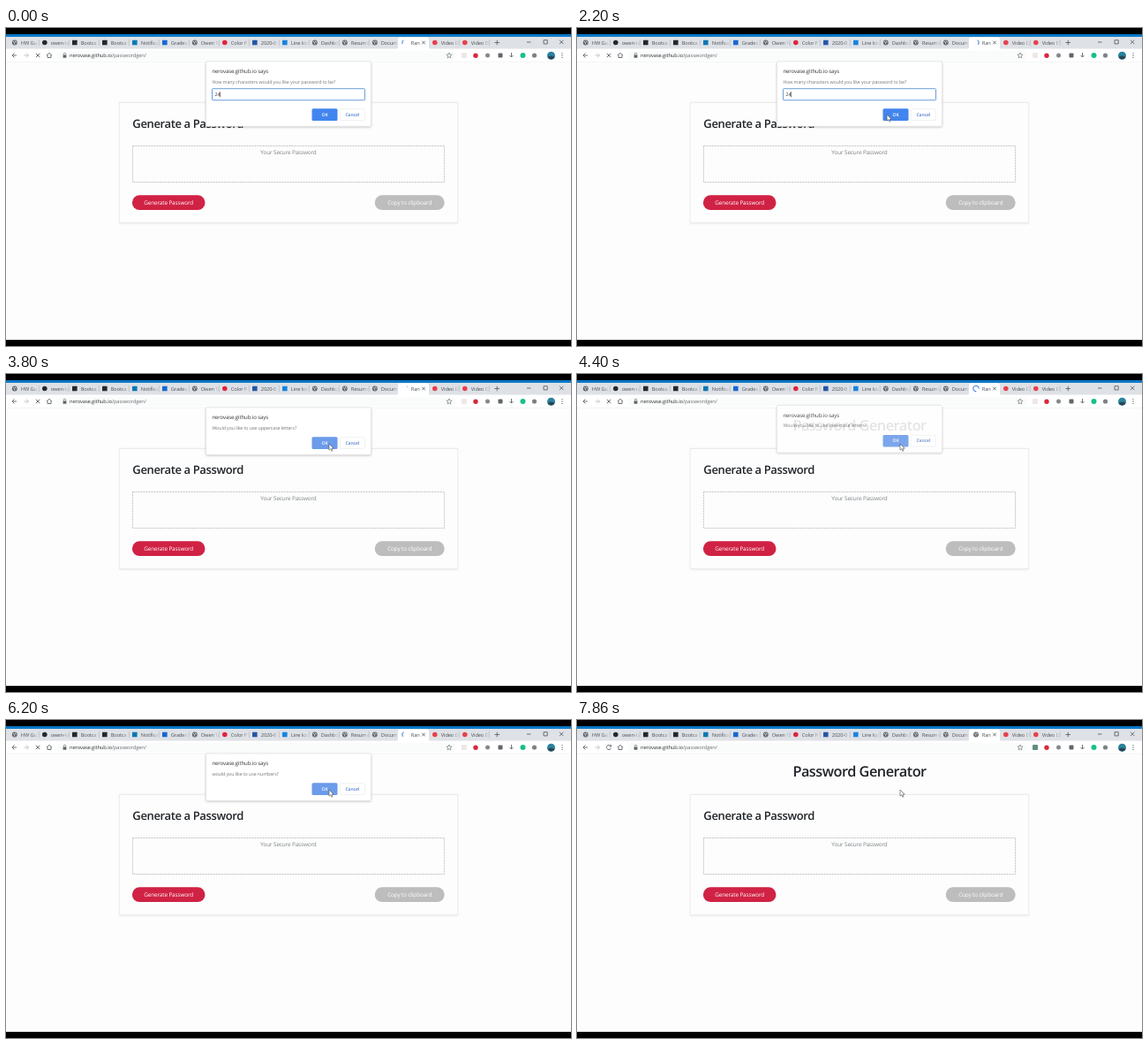
Animation of 640x360 px, one loop 8000 ms. Source, as an HTML page:

```html
<!DOCTYPE html>
<html lang="en">
<head>
<meta charset="utf-8">
<title>Password Generator</title>
<style>
  html, body { margin: 0; height: 100%; overflow: hidden; background: #000; }
  svg { display: block; width: 100vw; height: 100vh; }
  text { font-family: "Open Sans", "Noto Sans", sans-serif; letter-spacing: -.02em; text-rendering: geometricPrecision; white-space: pre; }
  .mid { text-anchor: middle; }
  .head { font-weight: 600; letter-spacing: -.03em; fill: #212529; }
  .tab { font-size: 5.7px; fill: #4d5156; }
  .line { fill: none; stroke: #5f6368; stroke-width: .9; }
  .body { font-size: 6.4px; }
  .btn { font-size: 5.1px; font-weight: 600; text-anchor: middle; }
</style>
</head>
<body>
<svg viewBox="0 0 640 360">
  <defs>
    <linearGradient id="fade"><stop stop-color="#dee1e6" stop-opacity="0"/><stop offset="1" stop-color="#dee1e6"/></linearGradient>
    <filter id="soft" x="-10%" y="-20%" width="120%" height="150%"><feDropShadow dx="0" dy=".8" stdDeviation="1.2" flood-opacity=".25"/></filter>
    <filter id="faint"><feDropShadow dx="0" dy=".5" stdDeviation="1" flood-opacity=".1"/></filter>
    <g id="globe">
      <circle r="2.9" fill="#5f6368"/>
      <path d="M-2-.9Q-.6-1.2-.3.2T.2 2M.3-2.1Q.2-.8 2-.4" fill="none" stroke="#e8eaed" stroke-width=".9"/>
    </g>
  </defs>

  <rect y="7" width="640" height="3" fill="#0a78c8"/>
  <rect y="10" width="640" height="14" fill="#dee1e6"/>
  <g id="tabs"></g>
  <path d="M441.500 24q2.500 0 2.500-2.500V13q0-2.500 2.500-2.500h30q2.500 0 2.500 2.500v8.500q0 2.500 2.500 2.500z" fill="#fff"/>
  <text class="tab" x="458.800" y="18.600">Ran</text>
  <path class="line" d="M471.200 14.700l3.600 3.600m0-3.600l-3.600 3.600M553.500 16.500h5.500m-2.750-2.750v5.500M590 16h4.500M609 13.700h4.200v4.200h-4.200zM627 13.700l4.400 4.400m0-4.400l-4.400 4.400"/>
  <path id="spinner" class="line" stroke-linecap="round" style="stroke:#2f73d8;stroke-width:1"/>
  <use id="favicon" href="#globe" x="452" y="16.500"/>

  <rect y="23.500" width="640" height="15" fill="#fff"/>
  <rect x="57" y="26" width="453" height="10.500" rx="5.200" fill="#fafbfb"/>
  <path class="line" d="M12 31H7m2.500-2.500L7 31l2.500 2.500"/>
  <path class="line" d="M20.500 31h5m-2.500-2.500l2.500 2.500-2.500 2.500" style="stroke:#bdc1c6"/>
  <path id="stop" class="line" d="M33.800 28.800l4.400 4.400m0-4.400l-4.400 4.400"/>
  <path id="reload" class="line" d="M38.200 29.400A2.600 2.600 0 1 0 38.600 31.700M38.600 28v2h-2"/>
  <path class="line" d="M46 31l3-2.700 3 2.700M47 30.500v3h4v-3"/>
  <rect x="64.600" y="30.500" width="3.800" height="3.200" fill="#5f6368"/>
  <path class="line" d="M65.300 30.500v-1a1.200 1.200 0 0 1 2.400 0v1" style="stroke-width:.7"/>
  <text x="72" y="33.200" font-size="5.800" fill="#303337">nerovase.github.io<tspan fill="#6b6f74">/passwordgen/</tspan></text>
  <path class="line" d="M502 28l.9 2 2.200.200-1.700 1.500.5 2.200-1.900-1.200-1.900 1.200.5-2.200-1.700-1.500 2.200-.200z" style="stroke-width:.6"/>
  <rect id="extension" x="516" y="28" width="6" height="6" rx="1"/>
  <circle cx="532" cy="31.300" r="2.700" fill="#d8283d"/>
  <circle cx="545.500" cy="31" r="2.500" fill="#85898d"/>
  <rect x="557.500" y="28.500" width="5" height="5" rx="1" fill="#62666a"/>
  <path class="line" d="M572.500 28v5m-2-2l2 2 2-2"/>
  <circle cx="585.500" cy="31" r="3" fill="#17c08a"/>
  <circle cx="598.500" cy="31" r="2.600" fill="#7d8185"/>
  <circle cx="617.500" cy="31.200" r="4.500" fill="#2b83a0"/>
  <path d="M613.500 33q4-3 8 0a4.500 4.500 0 0 1-8 0" fill="#2d4550"/>
  <path d="M630 28.600v.01m0 2.400v.01m0 2.400v.01" stroke="#5f6368" stroke-width="1.300" stroke-linecap="round"/>

  <rect y="38" width="640" height="315" fill="#fdfdfd"/>
  <path d="M0 38.300h640" stroke="#e9ebec" stroke-width=".6"/>
  <text class="head mid" x="320" y="64.300" font-size="16.300">Password Generator</text>
  <rect x="128.300" y="84.500" width="383.400" height="136" fill="#fdfdfd" stroke="#e6e6e6" stroke-width=".7" filter="url(#faint)"/>
  <text class="head" x="143.300" y="112.800" font-size="13.050">Generate a Password</text>
  <rect x="143.500" y="133.500" width="353" height="41" fill="#fdfdfd" stroke="#b5b5b5" stroke-width=".8" stroke-dasharray="2 1"/>
  <text class="body mid" x="320" y="142.600" fill="#7b8186">Your Secure Password</text>
  <rect x="142.900" y="189.200" width="82.600" height="16.900" rx="8.450" fill="#d02244"/>
  <text class="body mid" x="184.200" y="200" fill="#fff">Generate Password</text>
  <rect x="417.700" y="189.200" width="79" height="16.900" rx="8.450" fill="#bdbdbd"/>
  <text class="body mid" x="457.200" y="200" fill="#fff">Copy to clipboard</text>

  <g id="dialog">
    <rect id="panel" x="226.500" y="38" width="187" rx="1.500" fill="#fff" stroke="#d6d6d6" stroke-width=".5" filter="url(#soft)"/>
    <text x="233.400" y="51.200" font-size="6.100" fill="#303337">nerovase.github.io says</text>
    <text id="message" x="233.400" y="62.900" font-size="5.350" fill="#74787d"></text>
    <g id="field">
      <rect x="233.500" y="68.700" width="173" height="13" rx=".8" fill="#fff" stroke="#5a93d8" stroke-width=".9"/>
      <text x="236.600" y="77.100" font-size="5.200" fill="#333">24</text>
      <path id="caret" d="M242.300 72.200v6" stroke="#222" stroke-width=".7"/>
    </g>
    <g id="buttons">
      <rect id="ok" x="346.500" y="71.300" width="29" height="13.600" rx="1.500"/>
      <text class="btn" x="361" y="79.900" fill="#fff">OK</text>
      <rect x="378.300" y="71.700" width="28" height="12.800" rx="1.500" fill="#fff" stroke="#e6e8eb" stroke-width=".6"/>
      <text class="btn" x="392.300" y="79.900" fill="#4f7ccb">Cancel</text>
    </g>
  </g>

  <path id="cursor" d="M0 0v7.200l1.700-1.500 1.100 2.500 1.200-.5-1.100-2.500h2.300z" fill="#fff" stroke="#4a4a4a" stroke-width=".6"/>
  <path d="M0 0h640v7H0zM0 353h640v7H0z"/>
</svg>
<script>
const $ = id => document.getElementById(id);
const LOOP = 8000, SPIN_END = 7600, LOAD_END = 7860;

// title, icon colour (a globe if absent), round icon; null is the active tab
const tabs = [
  ["HW Gu"], ["owen-ta", "#24292e", true], ["Bootca", "#24282c"], ["Bootca", "#24282c"],
  ["Notifica", "#0a78b5"], ["Grades", "#1767d2"], ["Owen Ta"], ["Color P", "#e0243c", true],
  ["2020-0", "#2457a7"], ["Line Ico", "#1684e0"], ["Dashbo"], ["Resume"], ["Docum"],
  null, ["Video D", "#e8404e", true], ["Video D", "#e8404e", true]
];
$("tabs").innerHTML = tabs.map((tab, i) => {
  if (!tab) return "";
  const [name, color, round] = tab, x = 9.800 + i * 34;
  const icon = color
    ? `<rect x="${x - 2.8}" y="13.7" width="5.6" height="5.6" rx="${round ? 2.8 : .5}" fill="${color}"/>`
    : `<use href="#globe" x="${x}" y="16.5"/>`;
  return `<text class="tab" x="${x + 7}" y="18.6">${name}</text>${icon}
    <rect x="${x + 20}" y="12" width="7" height="10" fill="url(#fade)"/>
    <rect x="${x + 27}" y="11" width="7" height="12" fill="#dee1e6"/>
    <path d="M${x + 27.5} 13v7" stroke="#a5a9ae" stroke-width=".5"/>`;
}).join("");

const dialogs = [
  { from: -1000, to: 2600, ask: "How many characters would you like your password to be?", input: true },
  { from: 2660, to: 4230, ask: "Would you like to use uppercase letters?" },
  { from: 4290, to: 5690, ask: "Would you like to use lowercase letters?" },
  { from: 5750, to: 6450, ask: "would you like to use numbers?" },
  { from: 6510, to: 7520, ask: "Would you like to use special characters?" }
];

// time, x, y of the pointer tip
const path = [[900, 322, 82], [1260, 332, 86], [1900, 351, 98], [3050, 351.500, 98], [3700, 366, 79], [LOOP, 366, 79]];

const clamp = v => Math.max(0, Math.min(1, v));
const smooth = p => p * p * (3 - 2 * p);
const show = (id, on) => $(id).setAttribute("visibility", on ? "inherit" : "hidden");

function pointerAt(t) {
  const i = Math.max(1, path.findIndex(p => p[0] >= t));
  const [t0, x0, y0] = path[i - 1], [t1, x1, y1] = path[i];
  const k = smooth(clamp((t - t0) / (t1 - t0)));
  return [x0 + (x1 - x0) * k, y0 + (y1 - y0) * k];
}

function drawDialog(t) {
  const d = dialogs.find(d => t >= d.from && t < d.to);
  show("dialog", d);
  if (!d) return;
  const enter = 1 - (1 - clamp((t - d.from) / 170)) ** 2;
  $("dialog").setAttribute("opacity", enter);
  $("dialog").setAttribute("transform", `translate(0 ${-20 * (1 - enter)})`);
  $("message").textContent = d.ask;
  $("panel").setAttribute("height", d.input ? 73.300 : 53.300);
  $("buttons").setAttribute("transform", `translate(0 ${d.input ? 20 : 0})`);
  $("ok").setAttribute("fill", d.input ? "#4285ee" : "#6b9bea");
  show("field", d.input);
  show("caret", d.input && t % 1060 < 530);
}

function drawSpinner(t) {
  const phase = ((t - 1120) / 1333 % 1 + 1) % 1;
  const sweep = (6 + 264 * smooth(1 - Math.abs(2 * phase - 1))) * Math.PI / 180;
  const start = (160 + t / 1568 * 360) * Math.PI / 180;
  const at = a => `${452 + 3.300 * Math.cos(a)} ${16.500 + 3.300 * Math.sin(a)}`;
  $("spinner").setAttribute("d", `M${at(start)}A3.3 3.3 0 ${+(sweep > Math.PI)} 1 ${at(start + sweep)}`);
}

function draw(now) {
  const t = now % LOOP, loaded = t >= LOAD_END;
  drawDialog(t);
  drawSpinner(t);
  show("spinner", t < SPIN_END);
  show("favicon", t >= SPIN_END);
  show("stop", !loaded);
  show("reload", loaded);
  $("extension").setAttribute("fill", loaded ? "#5d8f7c" : "#efe6e6");
  show("cursor", t >= path[0][0]);
  $("cursor").setAttribute("transform", `translate(${pointerAt(t)})`);
  requestAnimationFrame(draw);
}
requestAnimationFrame(draw);
</script>
</body>
</html>
```
